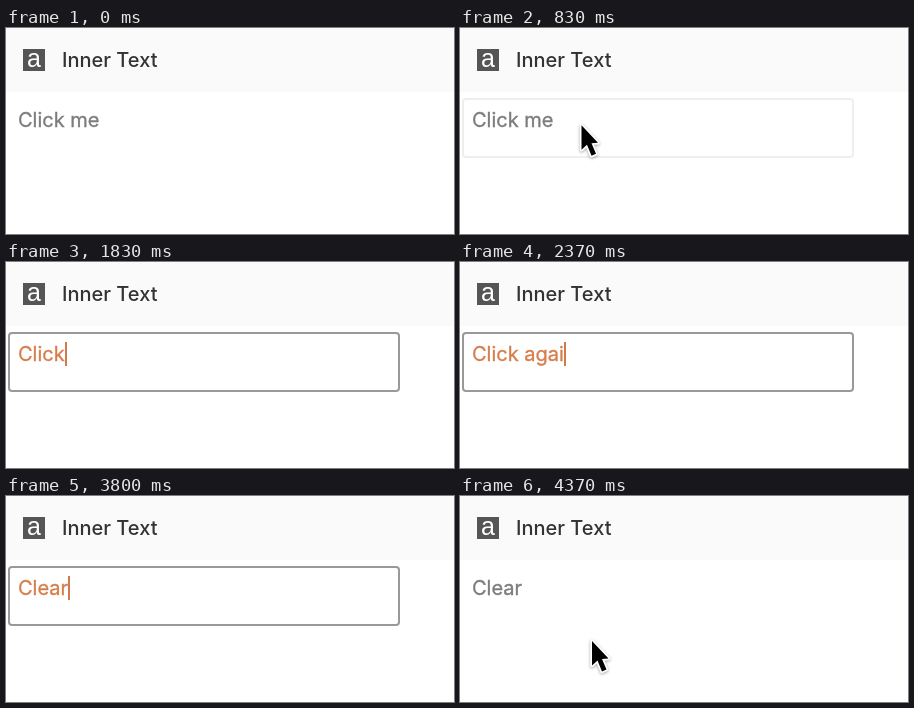
Write an HTML page that moves like this. It is 448 px wide and 206 px high and loops after 5.18 s.

```html
<!DOCTYPE html>
<html lang="en">
<head>
<meta charset="utf-8">
<title>Inline text editing</title>
<style>
  html, body { margin: 0; width: 100%; height: 100%; overflow: hidden; background: #fff; }
  svg { display: block; width: 448px; height: 206px; }
  text { font: 400 20px Inter, sans-serif; font-optical-sizing: none; white-space: pre; }
  #title { font-weight: 500; fill: #333; }
  #label { stroke-width: .35px; }
  #glyph { font: 400 25px "Liberation Sans", Arial, sans-serif; fill: #fff; }
  #pointer { filter: drop-shadow(0 1.5px 1.5px rgba(0, 0, 0, .35)); }
</style>
</head>
<body>
<svg viewBox="0 0 448 206">
  <rect width="448" height="206" fill="#fff"/>
  <rect width="448" height="64" fill="#fafafa"/>
  <rect x="17" y="21" width="22" height="22" fill="#555"/>
  <text id="glyph" x="28" y="38.5" text-anchor="middle">a</text>
  <text id="title" x="56" y="39">Inner Text</text>
  <rect id="box" x="3" y="71" width="390" height="58" rx="3" fill="#fff" stroke-width="2"/>
  <text id="label" x="12" y="99"></text>
  <rect id="caret" y="80" width="2" height="24" fill="#cf7a48"/>
  <g id="pointer">
    <path d="M0 0V24.5L5.5 19.5L10 30.5L14.5 28.5L10 18L16.5 17.5Z"
      stroke="#fff" stroke-width="3.4" stroke-linejoin="round" paint-order="stroke"/>
  </g>
</svg>
<script>
const LOOP = 5180;
const $ = id => document.getElementById(id);
const box = $('box'), label = $('label'), caret = $('caret'), pointer = $('pointer');

const WHITE = [255, 255, 255], PALE = [238, 238, 238], EDGE = [153, 153, 153];
const GREY = [124, 124, 124], ORANGE = [214, 126, 76];

// [start time, content]
const edits = [[0, 'Click me'], [1630, 'Click m'], [1730, 'Click '], [1830, 'Click']];
const type = (from, word, start, gap) =>
  [...word].forEach((c, i) => edits.push([start + i * gap, from + word.slice(0, i + 1)]));
type('Click', ' again', 1970, 92);
edits.push([2770, 'Click '], [2830, ''], [2870, 'C'], [2970, 'Cl']);
type('Cl', 'ear', 3030, 50);

const caretOn = [[1100, 1430], [1630, 3470], [3800, 4130]];

// [time, x, y]
const enter = [[700, 125, 194], [760, 123, 150], [830, 121.5, 97.5], [900, 121, 88], [1020, 120.5, 86]];
const leave = [[3840, 120.5, 86], [3910, 123, 108], [4030, 131, 154], [4120, 132, 145]];

const clamp = v => Math.max(0, Math.min(1, v));
const phase = (t, a, b) => clamp((t - a) / (b - a));
const mix = (a, b, k) => a + (b - a) * k;
const blend = (a, b, k) => `rgb(${a.map((v, i) => Math.round(mix(v, b[i], k)))})`;
const within = (t, [a, b]) => t >= a && t < b;

function along(path, t) {
  let i = 0;
  while (i < path.length - 2 && t >= path[i + 1][0]) i++;
  const [t0, x0, y0] = path[i], [t1, x1, y1] = path[i + 1];
  const k = phase(t, t0, t1);
  return [mix(x0, x1, k), mix(y0, y1, k)];
}

function draw(t) {
  const content = edits.filter(e => e[0] <= t).pop()[1];
  if (label.textContent !== content) label.textContent = content;

  const focus = phase(t, 1080, 1130);
  const ink = blend(GREY, ORANGE, focus * (1 - phase(t, 4230, 4370)));
  label.setAttribute('fill', ink);
  label.setAttribute('stroke', ink);

  const hover = blend(WHITE, PALE, phase(t, 760, 820));
  const edge = t < 1080 ? hover
    : t < 4230 ? blend(PALE, EDGE, focus)
    : blend(EDGE, WHITE, phase(t, 4230, 4300));
  box.setAttribute('stroke', edge);

  const blinking = caretOn.some(span => within(t, span));
  caret.style.display = blinking ? '' : 'none';
  if (blinking) {
    const width = content ? label.getComputedTextLength() : 0;
    caret.setAttribute('x', Math.round(12 + width));
  }

  const shown = within(t, [700, 1630]) || t >= 3840;
  pointer.style.display = shown ? '' : 'none';
  if (shown) pointer.setAttribute('transform', `translate(${along(t < 2000 ? enter : leave, t)})`);
}

const begin = performance.now();
function tick() {
  draw((performance.now() - begin) % LOOP);
  requestAnimationFrame(tick);
}
tick();
</script>
</body>
</html>
```
